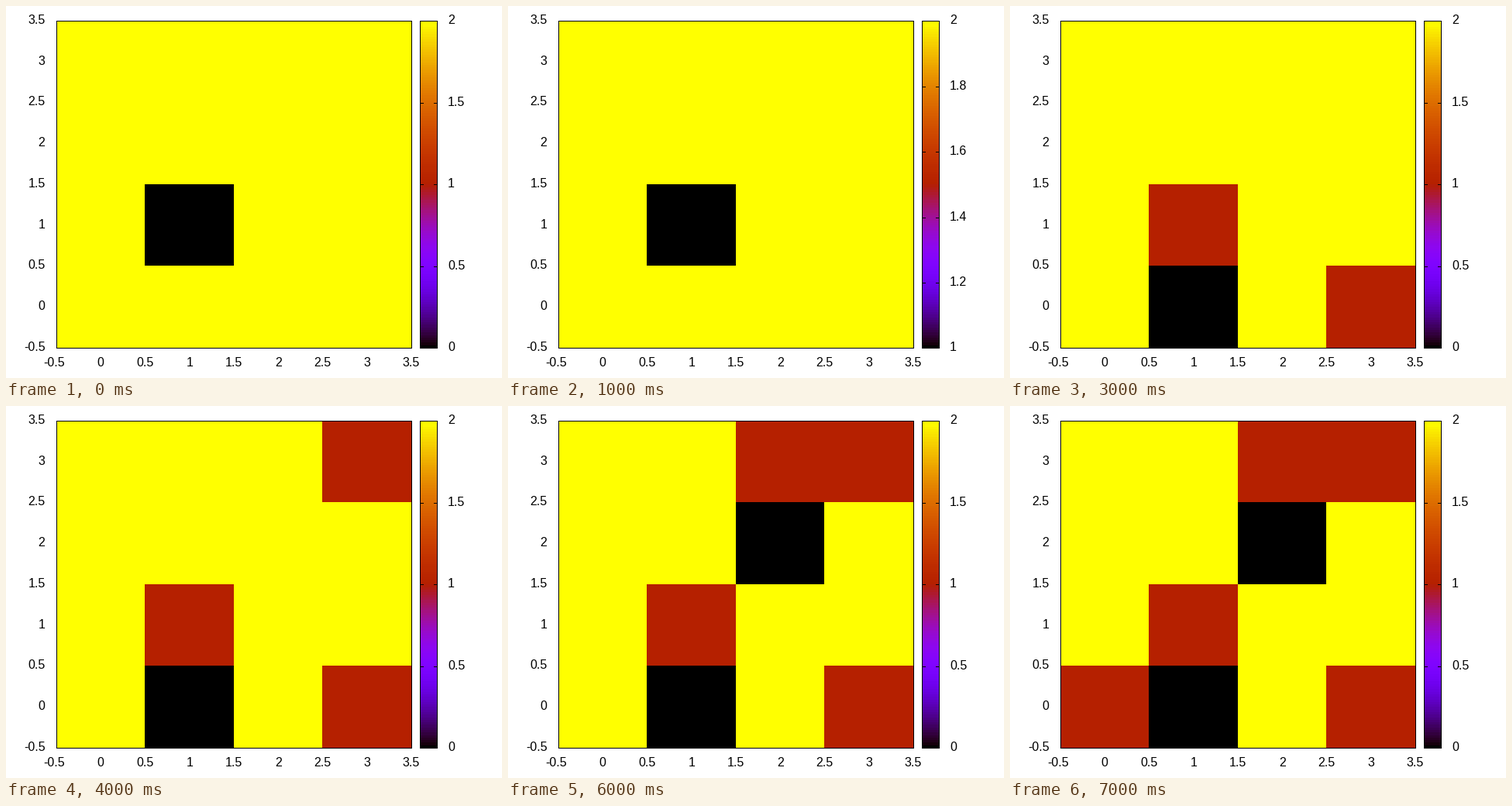
Write a matplotlib script that moves like this. It is 640 px wide and 480 px high and loops after 8000 ms.

```python
import math

import matplotlib.pyplot as plt
import numpy as np
from matplotlib.animation import FuncAnimation
from matplotlib.patches import Rectangle

W, H, DPI = 640, 480, 100
LEFT, RIGHT, TOP, BOTTOM = 65, 523, 19, 441
BAR_L, BAR_R = 534, 556
X_EDGES = [65, 179, 294, 408, 523]
Y_EDGES = [441, 335, 230, 124, 19]

# One cell (column, row, value) is lowered per step; None keeps the step's start state.
START = (1, 1, 0)
STEPS = [(1, 1, 1), (3, 0, 1), (1, 0, 0), (3, 3, 1), (2, 3, 1), (2, 2, 0), (0, 0, 1)]

plt.rcParams["font.family"] = "Liberation Sans"
fig = plt.figure(figsize=(W / DPI, H / DPI), dpi=DPI, facecolor="white")
ax = fig.add_axes([0, 0, 1, 1])


def box(x0, y0, x1, y1):
    """Fill the pixels from (x0, y0) up to, not including, (x1, y1)."""
    return ax.add_patch(Rectangle((x0, y0), x1 - x0, y1 - y0, fc="black",
                                  lw=0, antialiased=False, zorder=3))


def frame(x0, y0, x1, y1):
    box(x0, y0, x1 + 1, y0 + 1)
    box(x0, y1, x1 + 1, y1 + 1)
    box(x0, y0, x0 + 1, y1 + 1)
    box(x1, y0, x1 + 1, y1 + 1)


def label(x, y, value, ha):
    return ax.text(x, y, f"{value:g}", ha=ha, va="baseline",
                   fontsize=16 * 72 / DPI, color="black")


def bar_scale(low, step):
    """Tick marks and labels of the colour bar for values low to 2."""
    parts = []
    count = round((2 - low) / step)
    for i in range(count + 1):
        y = math.ceil(BOTTOM - (BOTTOM - TOP) * i / count)
        parts += [box(BAR_L, y, BAR_L + 5, y + 1),
                  box(BAR_R - 4, y, BAR_R + 1, y + 1),
                  label(570, y + 4, low + i * step, "left")]
    return parts


def grid_at(n):
    grid = np.full((4, 4), 2.0)
    for col, row, value in [START] + STEPS[:n]:
        grid[row, col] = value
    return grid


cells = ax.pcolormesh(X_EDGES, Y_EDGES, grid_at(0), cmap="gnuplot",
                      antialiased=False, zorder=1)
ax.imshow(np.linspace(1, 0, 128)[:, None], cmap="gnuplot", aspect="auto",
          interpolation="nearest", zorder=1,
          extent=(BAR_L + 1, BAR_R, BOTTOM, TOP + 1))
frame(LEFT, TOP, RIGHT, BOTTOM)
frame(BAR_L, TOP, BAR_R, BOTTOM)

for i in range(9):
    value = -0.5 + i / 2
    x = LEFT + (RIGHT - LEFT) * i / 8
    y = int(BOTTOM - (BOTTOM - TOP) * i / 8 + 0.49)
    label(x - 2.5 if value < 0 else x, 465, value, "center")
    label(50.5, y + 4, value, "right")

scales = {0: bar_scale(0, 0.5), 1: bar_scale(1, 0.2)}
ax.set_xlim(0, W)
ax.set_ylim(H, 0)
ax.axis("off")


def update(n):
    grid = grid_at(n)
    low = int(grid.min())
    cells.set_array(grid)
    cells.set_clim(low, 2)
    for key, parts in scales.items():
        for part in parts:
            part.set_visible(key == low)
    return [cells]


anim = FuncAnimation(fig, update, frames=8, interval=1000, repeat=True,
                     repeat_delay=0, blit=False)
plt.show()
```
